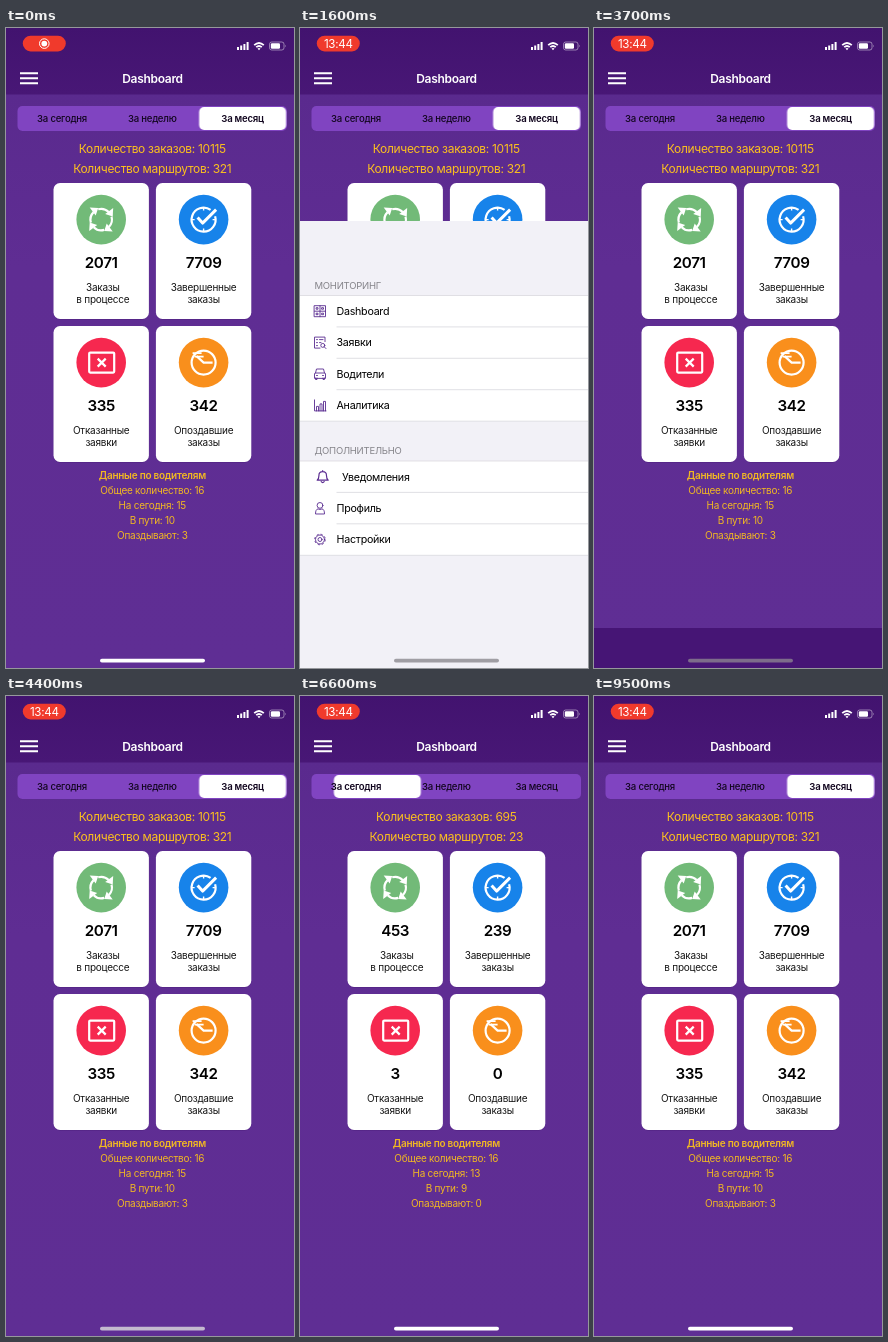
An HTML page for the animation above (9700 ms loop, 288x640 px).

```html
<!DOCTYPE html>
<html lang="ru">
<head>
<meta charset="utf-8">
<title>Dashboard</title>
<style>
  html, body { margin: 0; width: 100%; height: 100%; overflow: hidden; background: #5e2c92; }
  svg { display: block; width: 100vw; height: 100vh; }
  text { font-family: Inter, Roboto, sans-serif; letter-spacing: -.025em; white-space: pre; }
  .mid { text-anchor: middle; }
  .total { font-size: 12px; fill: #fcc01e; }
  .drivers { font-size: 10px; fill: #f2b822; }
  .bold { font-weight: 600; }
  .count { font-size: 15.2px; font-weight: 600; }
  .label { font-size: 10px; fill: #151515; }
  .tab { font-size: 9.6px; font-weight: 500; fill: #12061f; }
  .section { font-size: 9.5px; fill: #85848a; }
  .row { font-size: 10.7px; }
  .line { fill: none; stroke: #fff; stroke-width: 2.2; }
  .icon { fill: none; stroke: #5b2d91; stroke-width: .9; stroke-linejoin: round; stroke-linecap: round; }
</style>
</head>
<body>
<svg viewBox="0 0 288 640">
  <defs>
    <linearGradient id="head" x2="0" y2="1"><stop stop-color="#42136f"/><stop offset="1" stop-color="#481776"/></linearGradient>
    <linearGradient id="body" x2="0" y2="1"><stop stop-color="#5a2a8e"/><stop offset=".3" stop-color="#5f2d93"/><stop offset="1" stop-color="#5f2e94"/></linearGradient>
  </defs>
  <rect y="66" width="288" height="574" fill="url(#body)"/>
  <rect width="288" height="66.5" fill="url(#head)"/>
  <path d="M14 45.2H32M14 50.2H32M14 55.2H32" stroke="#fff" stroke-width="2"/>
  <text class="mid bold" x="146.5" y="54.6" font-size="12" fill="#fff">Dashboard</text>

  <rect x="11.5" y="78" width="269.5" height="25" rx="5" fill="#8044c1"/>
  <rect id="thumb" x="12.5" y="79" width="87" height="23" rx="5" fill="#fff"/>
  <g id="tabs"></g>
  <g id="cards"></g>
  <g id="views"></g>
  <rect id="bar" y="600" width="288" height="40" fill="#461575"/>
  <g id="sheet"><rect width="288" height="640" fill="#f2f1f7"/></g>

  <g fill="#fff">
    <path d="M231 19h2v3h-2zM234.2 17.6h2v4.4h-2zM237.4 16h2v6h-2zM240.6 14h2v8h-2z"/>
    <path d="M247.6 16.6Q253 11.6 258.4 16.6L257.2 17.8Q253 14 248.8 17.8ZM249.6 18.6Q253 15.6 256.4 18.6L255.2 19.8Q253 18 250.8 19.8ZM251.5 20.5Q253 19.3 254.5 20.5L253 22.2Z"/>
    <rect x="263.5" y="14" width="14.5" height="8" rx="2.2" fill="none" stroke="#fff" stroke-opacity=".5" stroke-width=".9"/>
    <rect x="264.8" y="15.3" width="9.2" height="5.4" rx="1.2"/>
    <path d="M279 16.7q1.4 1.3 0 2.6z" opacity=".6"/>
  </g>
  <rect x="16.8" y="7.8" width="43" height="15.6" rx="7.8" fill="#f03a2c"/>
  <g id="record"><circle cx="38.3" cy="15.6" r="4.8" fill="none" stroke="#fff"/><circle cx="38.3" cy="15.6" r="2.9" fill="#fff"/></g>
  <text id="clock" class="mid" x="38.3" y="19.8" font-size="11.6" fill="#fff">13:44</text>
  <rect id="home" x="94" y="630.7" width="105" height="3.8" rx="1.9"/>
</svg>
<script>
const LOOP = 9700;
const $ = id => document.getElementById(id);
const add = (parent, markup) => parent.insertAdjacentHTML('beforeend', markup);
const text = (cls, x, y, str) => `<text class="${cls}" x="${x}" y="${y}">${str}</text>`;

// steps: [ms, value, easing towards the next step]; without easing the value holds
function play(el, prop, steps) {
  const frames = steps.map(([ms, value, easing = 'steps(1, end)']) => ({ offset: ms / LOOP, [prop]: value, easing }));
  frames.push({ offset: 1, [prop]: steps[steps.length - 1][1] });
  el.animate(frames, { duration: LOOP, iterations: Infinity });
}

// Tabs: when each is tapped and which one becomes active
const taps = [[0, 2], [4500, 0], [6500, 1], [8500, 2]];
const SLIDE = 300;

const tabNames = ['За сегодня', 'За неделю', 'За месяц'];
tabNames.forEach((name, i) => {
  add($('tabs'), text('tab mid', 56 + 90.3 * i, 93.7, name));
  play($('tabs').lastElementChild, 'fontWeight', taps.map(([ms, tab]) => [ms && ms + SLIDE / 2, tab === i ? 600 : 500]));
});

const shift = i => `translateX(${90.3 * i}px)`;
play($('thumb'), 'transform', taps.flatMap(([ms, tab], i) =>
  i ? [[ms, shift(taps[i - 1][1]), 'ease-in-out'], [ms + SLIDE, shift(tab)]] : [[0, shift(tab)]]));

// Cards: colour, two label lines, icon, label offset
const arrows = [0, 90, 180, 270].map(a =>
  `<g transform="rotate(${a})"><path class="line" d="M-3 -10.3A10.7 10.7 0 0 1 7.5 -7.6"/><path d="M12 -11.5L11.5 -3L4 -5.5Z" fill="#fff"/></g>`).join('');
const cards = [
  ['#72ba78', 'Заказы', 'в процессе', arrows, 1.6],
  ['#1783ea', 'Завершенные', 'заказы',
    `<path class="line" d="M7 -9.7A12 12 0 1 0 11.5 -3.4"/><path class="line" stroke-linejoin="round" d="M-6 -2L-1 3.5L12.5 -10" style="stroke-width:3"/>
     <path class="line" d="M-12 0H-9M12 0H9M0 12V9M0 -12V-9" style="stroke-width:1.4"/>`],
  ['#f6284f', 'Отказанные', 'заявки',
    '<rect class="line" x="-12" y="-10" width="25" height="20" rx="1"/><path class="line" d="M-3.5 -4L4.5 4M4.5 -4L-3.5 4"/>'],
  ['#f98f1c', 'Опоздавшие', 'заказы',
    `<circle class="line" r="12"/><path class="line" d="M-7 -6.5L0 0H9"/>
     <path class="line" d="M-11 -9.5H-2M-9 -6H0" style="stroke-width:1.7"/>`],
];
const cardPos = i => [95.2 + 102.4 * (i % 2), 155 + 143 * (i >> 1)];
cards.forEach(([color, first, second, icon, dx = 0], i) => {
  const [x, y] = cardPos(i);
  add($('cards'), `<rect x="${x - 47.7}" y="${y + .5}" width="95.4" height="136.4" rx="7" fill="#3c1768" opacity=".25"/>
    <rect x="${x - 47.7}" y="${y}" width="95.4" height="136" rx="6.5" fill="#fff"/>
    <g transform="translate(${x} ${y + 36.6})"><circle r="24.8" fill="${color}"/>${icon}</g>
    ${text('label mid', x + dx, y + 108.2, first)}${text('label mid', x + dx, y + 120.2, second)}`);
});

// Figures per tab: orders, routes, four cards, four driver counts
const figures = [
  [695, 23, [453, 239, 3, 0], [16, 13, 9, 0]],
  [1464, 47, [699, 750, 15, 12], [16, 14, 9, 2]],
  [10115, 321, [2071, 7709, 335, 342], [16, 15, 10, 3]],
];
const driverLabels = ['Общее количество', 'На сегодня', 'В пути', 'Опаздывают'];
figures.forEach(([orders, routes, counts, drivers], i) => {
  add($('views'), `<g>
    ${text('total mid', 146.3, 125.4, 'Количество заказов: ' + orders)}
    ${text('total mid', 146.3, 145.2, 'Количество маршрутов: ' + routes)}
    ${counts.map((n, k) => text('count mid', cardPos(k)[0], cardPos(k)[1] + 84.7, n)).join('')}
    ${text('drivers mid bold', 146.3, 451, 'Данные по водителям')}
    ${drivers.map((n, k) => text('drivers mid', 146.3, 466 + 15 * k, `${driverLabels[k]}: ${n}`)).join('')}
  </g>`);
  play($('views').lastElementChild, 'opacity', taps.map(([ms, tab]) => [ms && ms + SLIDE, +(tab === i)]));
});

// Menu sheet; icons are drawn around their own centre
const menu = [
  [67.6, 'МОНИТОРИНГ', [
    ['Dashboard', '<path d="M-5.5 -5.5H5.5V5.5H-5.5ZM0 -5.5V5.5M-5.5 0H5.5"/><path d="M-3.5 -3.5h1.5v1.5h-1.5zM2 -3.5h1.5v1.5h-1.5zM-3.5 2h1.5v1.5h-1.5zM2 2h1.5v1.5h-1.5z"/>'],
    ['Заявки', '<path d="M5 -1V-5.5H-5.5V5.5H0M-3.5 -3H-2.5M-.5 -3H3M-3.5 0H-2.5M-.5 0H1M-3.5 3H-2.5M4.2 4.2L6 6"/><circle cx="2.8" cy="2.8" r="2"/>'],
    ['Водители', '<path d="M-4.5 -1L-3.5 -5H3.5L4.5 -1M-5.5 4V0Q-5.5 -1 -4.5 -1H4.5Q5.5 -1 5.5 0V4ZM-4.5 4V5.5H-3V4M4.5 4V5.5H3V4M-3.5 1.5H-2.5M3.5 1.5H2.5"/>'],
    ['Аналитика', '<path d="M-5.5 -5.5V5.5H6M-3.5 5.5V1H-1.5V5.5M0 5.5V-1.5H2V5.5M3.5 5.5V-4H5.5V5.5"/>'],
  ]],
  [233.1, 'ДОПОЛНИТЕЛЬНО', [
    ['Уведомления', '<path stroke-width="1.2" d="M-5.5 3.5Q-3.8 2 -3.8 -1Q-3.8 -5 0 -5Q3.8 -5 3.8 -1Q3.8 2 5.5 3.5ZM-1.5 5Q0 6.8 1.5 5M0 -5V-6"/>'],
    ['Профиль', '<circle cy="-2.7" r="2.9"/><path d="M-4.5 5.5Q-4.5 1.2 -2 .8Q0 2 2 .8Q4.5 1.2 4.5 5.5Z"/>'],
    ['Настройки', '<circle r="2"/><circle r="4.5"/><circle r="5.3" stroke-linecap="butt" stroke-dasharray="2.08"/>'],
  ]],
];
const ROW = 31.4;
menu.forEach(([y, title, rows]) => {
  const top = y + 6.9;
  add($('sheet'), text('section', 14.5, y, title) +
    `<rect x="-1" y="${top}" width="290" height="${ROW * rows.length}" fill="#fff" stroke="#d6d5da" stroke-width=".7"/>`);
  rows.forEach(([name, icon], i) => {
    const mid = top + ROW * (i + .5);
    const inset = name === 'Уведомления';
    if (i) add($('sheet'), `<path d="M36.5 ${top + ROW * i}H288" stroke="#d9d8dd" stroke-width=".8"/>`);
    add($('sheet'), `<g class="icon" transform="translate(${inset ? 22.7 : 20} ${mid})">${icon}</g>` +
      text('row', inset ? 42 : 36.5, mid + 3.8, name));
  });
});

const spring = 'cubic-bezier(.32, .72, 0, 1)';
const below = 'translateY(640px)', open = 'translateY(0px)';
play($('sheet'), 'transform', [[0, below], [1494, below, spring], [1994, open], [3180, open, spring], [3680, below]]);
play($('bar'), 'opacity', [[0, 0], [3180, 1], [3800, 0]]);
play($('home'), 'fill', [
  [0, '#fff'], [1494, '#fff', 'linear'], [1600, '#a09ea4', 'linear'], [2000, '#706e76'],
  [3700, '#7d6c8b', 'linear'], [4000, '#b5a9c3', 'linear'], [6000, '#fff'],
]);
play($('record'), 'opacity', [[0, 1], [600, 1, 'linear'], [800, 0]]);
play($('clock'), 'opacity', [[0, 0], [600, 0, 'linear'], [800, 1]]);
</script>
</body>
</html>
```
